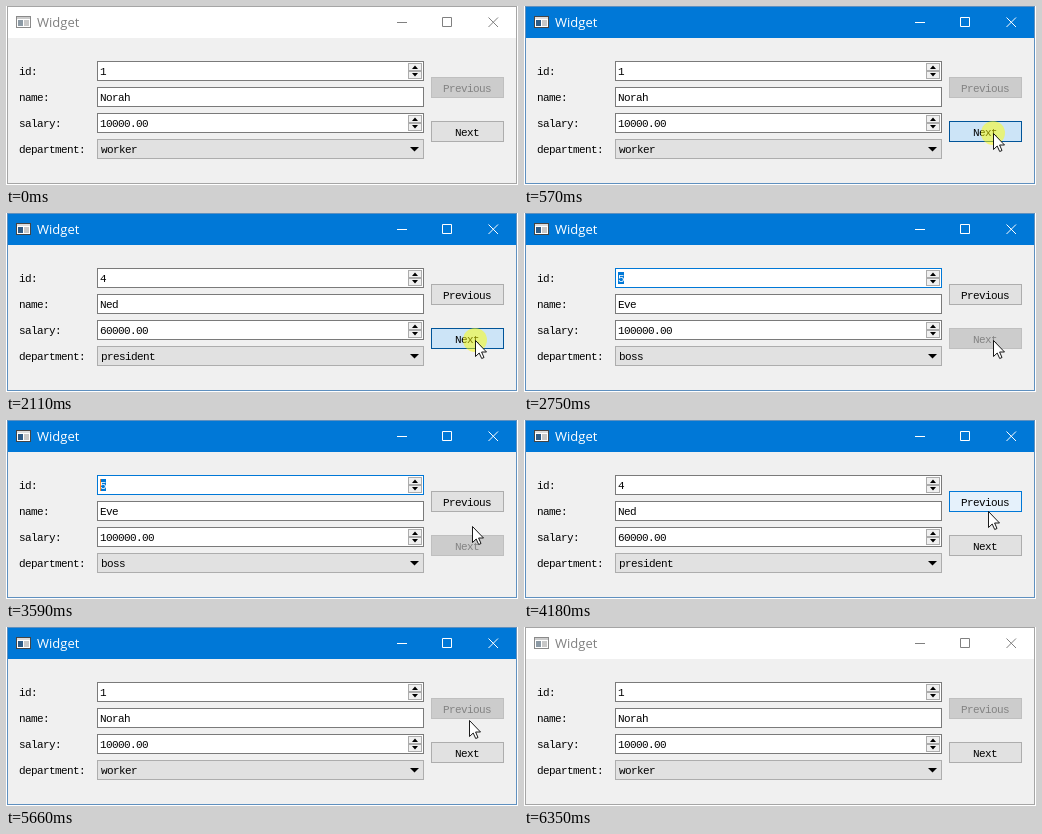
An HTML page that plays this animation: 512 px wide and 179 px high, repeating every 6450 ms.

```html
<!DOCTYPE html>
<html lang="en">
<head>
<meta charset="utf-8">
<title>Widget</title>
<style>
  html, body { margin: 0; width: 100%; height: 100%; overflow: hidden; background: #fff; }
  svg { display: block; }
  text { font: 11px "Liberation Mono", monospace; letter-spacing: -.6px; white-space: pre; }
  .title { font: 13px "Open Sans", sans-serif; letter-spacing: 0; }
</style>
</head>
<body>
<svg id="stage" width="512" height="179" viewBox="0 0 512 179"></svg>
<script>
const LOOP = 6450;
const stage = document.getElementById('stage');

const records = [
  ['Norah', '10000.00', 'worker'],
  ['Tess', '20000.00', 'worker'],
  ['Gwen', '30000.00', 'manager'],
  ['Ned', '60000.00', 'president'],
  ['Eve', '100000.00', 'boss'],
];

// Mouse presses: down, up, change of record
const clicks = [
  [570, 670, 1], [1090, 1190, 1], [1500, 1600, 1], [2110, 2190, 1], [2930, 3030, 0],
  [4080, 4180, -1], [4410, 4560, -1], [4790, 4870, -1], [5020, 5100, -1],
];

// Pointer moves: start, end, from, to, number of steps, easing
const easeOut = p => 1 - (1 - p) ** 2;
const easeIn = p => p ** 1.5;
const easeInOut = p => p * p * (3 - 2 * p);
const moves = [
  [30, 390, [480, 150], [469, 127], 8, easeOut],
  [3210, 3770, [469, 127], [464, 95], 10, easeInOut],
  [4000, 4030, [464, 95], [464, 91], 1, easeOut],
  [5660, 5990, [463, 93], [472, 180], 7, easeIn],
];

function pointerAt(t) {
  const move = moves.findLast(m => t >= m[0]);
  if (!move || t >= 5990) return null;
  const [start, end, from, to, steps, ease] = move;
  const p = Math.min(1, (t - start) / (end - start));
  const k = ease(Math.floor(p * steps + 1e-6) / steps);
  return from.map((v, i) => Math.round(v + (to[i] - v) * k));
}

const fill = (x, y, w, h, color) =>
  `<rect x="${x}" y="${y}" width="${w}" height="${h}" fill="${color}"/>`;
const box = (x, y, w, h, color, border) =>
  `<rect x="${x + .5}" y="${y + .5}" width="${w - 1}" height="${h - 1}" fill="${color}" stroke="${border}"/>`;
const label = (x, y, str, color = '#000', extra = '') =>
  `<text x="${x}" y="${y}" fill="${color}" ${extra}>${str}</text>`;
const path = (d, attrs = '') => `<path d="${d}" ${attrs}/>`;

function titleBar(active) {
  const ink = active ? '#fff' : '#808080';
  const pane = active ? '#2d5b86' : '#8c9aa5';
  const frame = active ? '#444' : '#8a8a8a';
  return fill(1, 0, 510, 32, active ? '#0078d7' : '#fff') +
    box(10, 10, 15, 12, '#fff', frame) + fill(11, 11, 13, 2, active ? '#ddd' : '#ccc') +
    fill(12, 14, 5, 6, pane) + fill(18, 14, 5, 6, '#c8c8c8') +
    label(31, 21, 'Widget', ink, 'class="title"') +
    path('M391 16.5h10M436.5 11.5h9v9h-9zM482.5 11.5l9.5 9.5M492 11.5l-9.5 9.5',
      `fill="none" stroke="${ink}"`);
}

function spinButtons(y) {
  return box(402, y + 2, 14, 8, '#f0f0f0', '#acacac') + box(402, y + 10, 14, 8, '#f0f0f0', '#acacac') +
    path(`M406 ${y + 8}l3-3.5 3 3.5zM406 ${y + 12}l3 3.5 3-3.5z`);
}

function field(y, str, focused, spin) {
  return box(91, y, 327, 20, '#fff', focused ? '#0078d7' : '#7a7a7a') +
    (focused ? fill(94, 59, 6, 12, '#0078d7') : '') +
    label(94, y + 14, str, focused ? '#fff' : '#000') +
    (spin ? spinButtons(y) : '');
}

function button(y, str, enabled, hovered, pressed) {
  const [color, border, ink] = !enabled ? ['#ccc', '#bfbfbf', '#838383']
    : pressed ? ['#cce4f7', '#005499', '#000']
    : hovered ? ['#e5f1fb', '#0078d7', '#000']
    : ['#e1e1e1', '#adadad', '#000'];
  return box(425, y, 73, 21, color, border) +
    label(461 - str.length * 3, y + 15, str, ink);
}

function draw(t) {
  const active = t >= 570 && t < 6350;
  const index = clicks.reduce((n, [, up, step]) => n + (t >= up ? step : 0), 0);
  const [name, salary, department] = records[index];
  const pressed = clicks.some(([down, up]) => t >= down && t < up);
  const pointer = pointerAt(t);
  const over = y => !!pointer && pointer[1] >= y && pointer[1] < y + 21;
  const focused = t >= 2190 && t < 4080;
  const caret = focused && Math.floor((t - 2190) / 560) % 2 === 0;

  let out = fill(0, 0, 512, 179, '#fff') + fill(1, 0, 510, 178, '#f0f0f0') + titleBar(active) +
    box(1, 0, 510, 178, 'none', active ? '#5f90bf' : '#a5a5a5');

  ['id:', 'name:', 'salary:', 'department:'].forEach((str, i) => out += label(13, 69 + 26 * i, str));
  out += field(55, index + 1, focused, true) + (caret ? fill(94, 59, 1, 12, '#ff8728') : '') +
    field(81, name) + field(107, salary, false, true) +
    box(91, 133, 327, 20, '#e1e1e1', '#adadad') + label(95, 147, department) + path('M404 141h9l-4.5 4.5z');

  out += button(71, 'Previous', index > 0, over(71), pressed && over(71)) +
    button(115, 'Next', index < records.length - 1, over(115), pressed && over(115));

  if (pointer) {
    const [x, y] = pointer;
    if (pressed) out += `<circle cx="${x}" cy="${y}" r="12" fill="#ff0" fill-opacity=".5"/>`;
    out += path('M.5 .5V16.5L4.2 13 6.7 18.5 9 17.5 6.6 12H11.5Z',
      `transform="translate(${x} ${y})" fill="#fff" stroke="#000" stroke-width=".9"`);
  }
  stage.innerHTML = out;
}

function tick() {
  draw(performance.now() % LOOP);
  requestAnimationFrame(tick);
}
tick();
</script>
</body>
</html>
```
